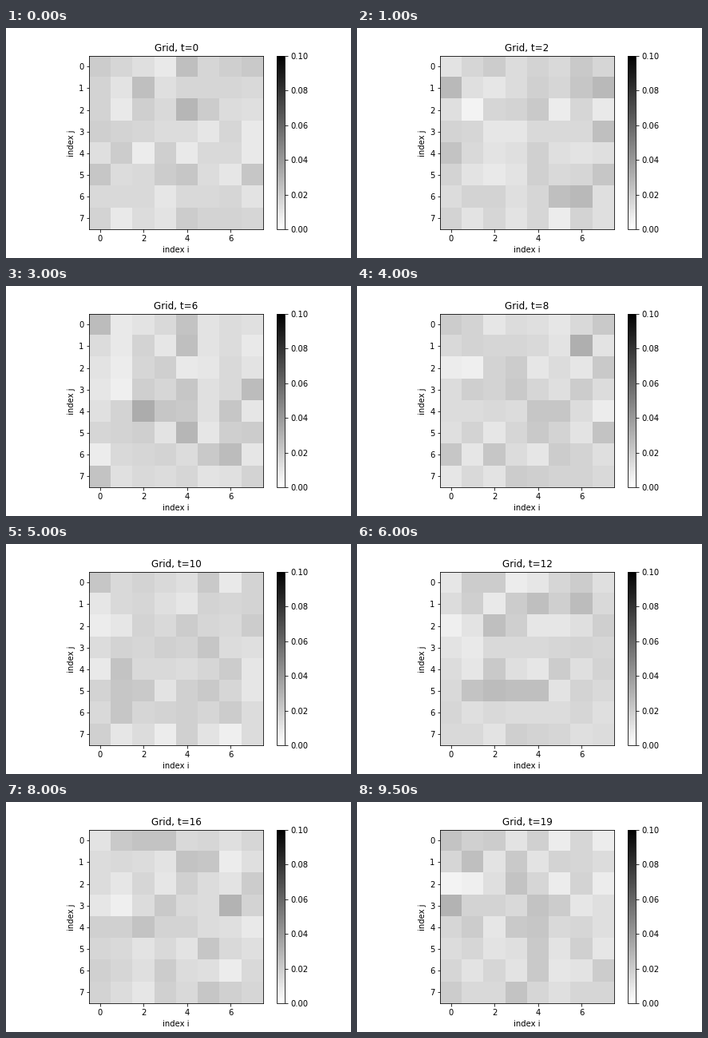
Animation, 432 px wide and 288 px high, one loop 10 s. Source, as a matplotlib script:

```python
import numpy as np
import matplotlib.pyplot as plt
from matplotlib.animation import FuncAnimation

SIZE = 8
STEPS = 20
STEP_MS = 500
SAMPLES = 800

plt.rcParams.update({"font.family": "DejaVu Sans", "font.size": 10})


def site_weights():
    """Occupation weights: nearly uniform, with a few biased sites."""
    weights = np.ones((SIZE, SIZE))
    biased = {(2, 0): 0.55, (2, 1): 0.55, (2, 5): 0.8, (4, 7): 0.8,
              (5, 4): 1.4, (4, 1): 1.2, (4, 2): 1.15}
    for site, weight in biased.items():
        weights[site] = weight
    return weights / weights.sum()


WEIGHTS = site_weights()


def density(t):
    rng = np.random.default_rng(100 + t)
    counts = rng.multinomial(SAMPLES, WEIGHTS.ravel())
    return counts.reshape(SIZE, SIZE) / SAMPLES


fig, ax = plt.subplots(figsize=(6, 4), dpi=72, facecolor="white")
fig.subplots_adjust(left=0.125, right=0.9, bottom=0.125, top=0.88)

image = ax.imshow(density(0), cmap="binary", vmin=0, vmax=0.1,
                  interpolation="nearest")
fig.colorbar(image, ax=ax, ticks=np.linspace(0, 0.1, 6), format="%.2f")
ax.set_xticks(range(0, SIZE, 2))
ax.set_yticks(range(SIZE))
ax.set_xlabel("index i")
ax.set_ylabel("index j", y=0.495)
title = ax.set_title("Grid, t=0", fontsize=12)


def update(t):
    image.set_data(density(t))
    title.set_text(f"Grid, t={t}")
    return image, title


animation = FuncAnimation(fig, update, frames=STEPS, interval=STEP_MS,
                          repeat=True, repeat_delay=0, blit=False)
plt.show()
```
